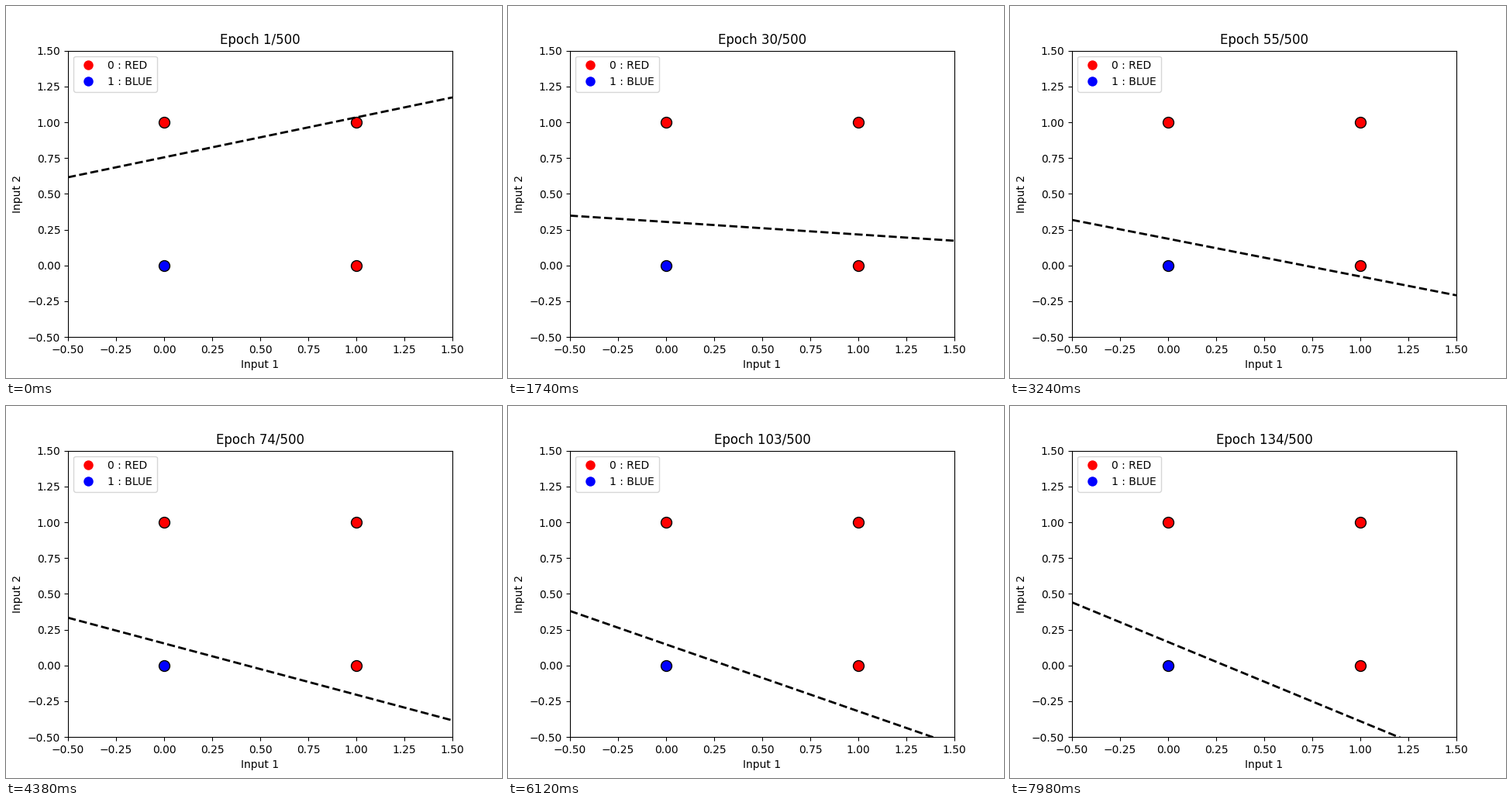
A matplotlib script that plays this animation: 640x480 px, repeating every 8000 ms.

```python
import matplotlib.pyplot as plt
import numpy as np
from matplotlib.animation import FuncAnimation
from matplotlib.lines import Line2D

EPOCHS = 500
SHOWN = 134
TICK = 20          # ms per animation frame
TICKS_PER_EPOCH = 3
RATE = 0.1

X = np.array([[0, 0], [0, 1], [1, 0], [1, 1]])
Y = np.array([1, 0, 0, 0])
COLORS = ["red", "blue"]


def train(w, b, epochs):
    """Sigmoid neuron with squared error; returns the weights of every epoch."""
    history = []
    for _ in range(epochs):
        history.append((w.copy(), b))
        p = 1 / (1 + np.exp(-(X @ w + b)))
        delta = (p - Y) * p * (1 - p)
        w = w - RATE * (X.T @ delta)
        b = b - RATE * delta.sum()
    return history


history = train(np.array([0.435, -1.56]), 1.178, SHOWN)

fig, ax = plt.subplots(figsize=(6.4, 4.8), dpi=100)
ax.set_xlim(-0.5, 1.5)
ax.set_ylim(-0.5, 1.5)
ax.set_xlabel("Input 1")
ax.set_ylabel("Input 2")

for (px, py), label in zip(X, Y):
    ax.plot(px, py, "o", markersize=10, color=COLORS[label],
            markeredgecolor="black")

boundary, = ax.plot([], [], "k--", linewidth=2)
title = ax.set_title("")

handles = [
    Line2D([0], [0], marker="o", color="w", markerfacecolor=color,
           markersize=10, label=f"{i} : {color.upper()}")
    for i, color in enumerate(COLORS)
]
ax.legend(handles=handles, loc="upper left")

ends = np.array([-0.5, 1.5])


def update(tick):
    epoch = tick // TICKS_PER_EPOCH
    w, b = history[epoch]
    boundary.set_data(ends, -(w[0] * ends + b) / w[1])
    title.set_text(f"Epoch {epoch + 1}/{EPOCHS}")
    return boundary, title


anim = FuncAnimation(fig, update, frames=400, interval=TICK,
                     repeat=True, repeat_delay=0, blit=False)
plt.show()
```
